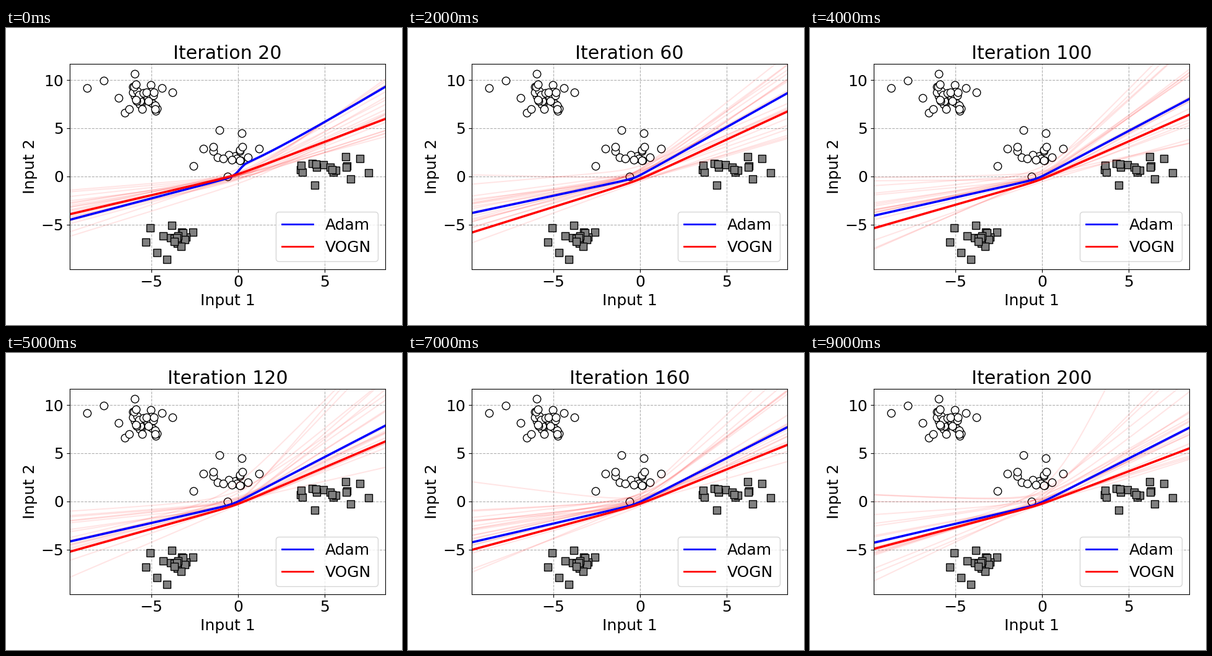
Write a matplotlib script that moves like this. It is 640 px wide and 480 px high and loops after 10 s.

```python
import numpy as np
import matplotlib.pyplot as plt
from matplotlib.animation import FuncAnimation

plt.rcParams.update({"font.family": "DejaVu Sans", "font.size": 18})

W, H = 640, 480
LEFT, RIGHT = 103.0, 613.0
N_STEPS, N_SAMPLES = 10, 20


def data_x(px):
    return (np.asarray(px) - 375.0) / 28.0


def data_y(py):
    return (239.8 - np.asarray(py)) / 15.567


def cluster(rng, center, spread, count, outer):
    """A clipped Gaussian core plus the few points that mark its outline."""
    core = np.clip(rng.normal(size=(count, 2)), -1.7, 1.7)
    return np.vstack([outer, np.array(center) + core * spread])


rng = np.random.default_rng(12)
CIRCLES = np.vstack([
    cluster(rng, (218, 111), (21, 12), 30,
            [(131, 97), (158, 85), (208, 74), (269, 104), (242, 134), (192, 137)]),
    cluster(rng, (366, 207), (20, 9), 14,
            [(345, 165), (381, 170), (303, 223), (409, 195), (358, 240), (319, 195)]),
])
SQUARES = np.vstack([
    cluster(rng, (276, 341), (13, 7), 13,
            [(233, 323), (268, 319), (302, 330), (226, 346), (244, 363), (260, 374)]),
    cluster(rng, (514, 226), (22, 5), 12,
            [(476, 229), (499, 254), (549, 208), (572, 211), (586, 234), (557, 244)]),
])

xs = np.linspace(LEFT - 1, RIGHT + 1, 300)


def hinge(left, corner, right, xc, soft):
    """Two straight arms joined by a rounded corner, in stage pixels."""
    a = (corner - left) / (xc - LEFT)
    b = (right - corner) / (RIGHT - xc)
    u = xs - xc
    return corner + (a + b) / 2 * u + (b - a) / 2 * np.hypot(u, soft)


def adam_curve(t):
    left = 307 - 22 * np.exp(-0.45 * t) + 25 * np.exp(-1.6 * t)
    right = 121 - 25.5 * np.exp(-(t / 3.2) ** 1.5)
    corner = 246 - 5 * np.exp(-0.3 * t)
    # Early bulge right of the corner
    rise = 1 / (1 + np.exp(-(xs - 376) / 4))
    bulge = 10 * np.exp(-2 * t - np.abs(xs - 386) / 70) * rise
    return hinge(left, corner, right, 367, 10) - bulge


def vogn_curve(t):
    early = np.exp(-1.8 * t)
    left = 315 + 33 * np.exp(-t / 3) - 47 * early
    right = 129 + 2.8 * t + 18 * early
    corner = 248 - 0.2 * t - 9 * early
    return hinge(left, corner, right, 370, 18)


def sample_curves(t):
    """Boundaries drawn at random, fanning out wider with every step."""
    rng = np.random.default_rng(70 + t)
    for _ in range(N_SAMPLES):
        left = rng.normal(297, 22 + 1.6 * t)
        right = 192 - rng.gamma(2, 33 + 2 * t)
        corner = rng.normal(243, 3.5)
        yield hinge(left, corner, right, rng.normal(377, 9), rng.uniform(12, 55))


fig, ax = plt.subplots(figsize=(W / 100, H / 100), dpi=100, facecolor="white")
ax.set(xlim=(-9.7, 8.5), ylim=(-9.65, 11.7), xticks=(-5, 0, 5),
       yticks=(-5, 0, 5, 10), xlabel="Input 1", ylabel="Input 2")
ax.set_axisbelow(True)
ax.grid(linestyle="--")
title = ax.set_title("Iteration 20")
fig.tight_layout()
box = ax.bbox
ax.set_xlim(data_x([box.x0, box.x1]))
ax.set_ylim(data_y([H - box.y0, H - box.y1]))

for points, marker, color in ((CIRCLES, "o", "white"), (SQUARES, "s", "gray")):
    ax.scatter(data_x(points[:, 0]), data_y(points[:, 1]), s=80, marker=marker,
               c=color, edgecolors="black", linewidths=1)

samples = [ax.plot([], [], color="red", alpha=0.1, lw=1.5)[0]
           for _ in range(N_SAMPLES)]
adam, = ax.plot([], [], color="blue", lw=2.6)
vogn, = ax.plot([], [], color="red", lw=2.6)
keys = [plt.Line2D([], [], color=c, lw=2) for c in ("blue", "red")]
ax.legend(keys, ["Adam", "VOGN"], loc="lower right")


def update(t):
    title.set_text(f"Iteration {20 * (t + 1)}")
    curves = [adam_curve(t), vogn_curve(t), *sample_curves(t)]
    for line, curve in zip([adam, vogn, *samples], curves):
        line.set_data(data_x(xs), data_y(curve))
    return [title, adam, vogn, *samples]


anim = FuncAnimation(fig, update, frames=N_STEPS, interval=1000,
                     init_func=lambda: update(0), repeat=True, repeat_delay=0)
plt.show()
```
